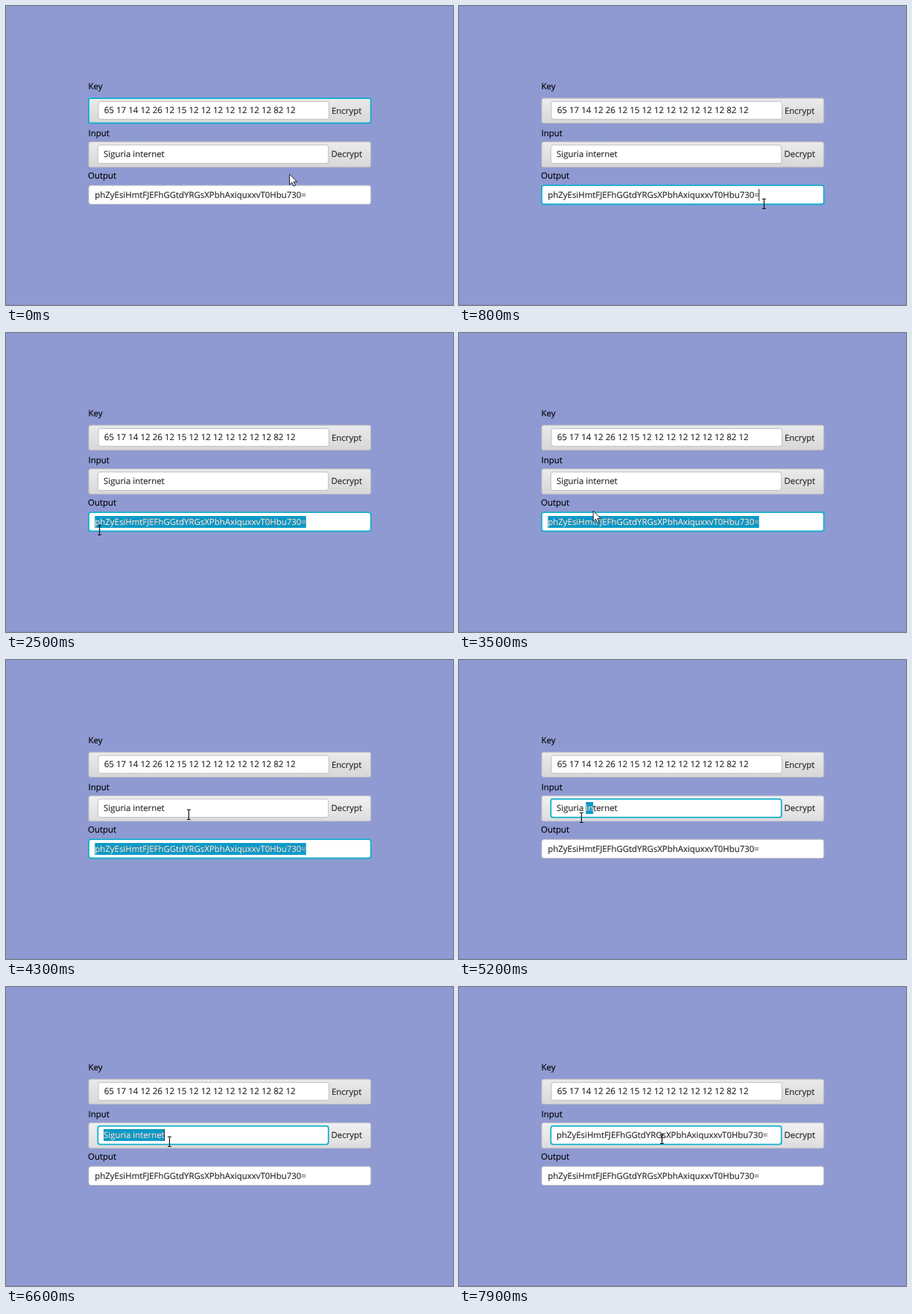
An HTML page that plays this animation: 600x402 px, repeating every 8000 ms.

```html
<!DOCTYPE html>
<html>
<head>
<meta charset="utf-8">
<style>
  html, body { margin: 0; width: 100%; height: 100%; overflow: hidden; background: #8f9ad2; }
  svg { display: block; }
  text {
    font: 11.42px "Open Sans", "Noto Sans", sans-serif; text-rendering: geometricPrecision; white-space: pre;
    fill: #262626; stroke: #262626; stroke-width: .15;
  }
  .label { fill: #000; stroke: #000; }
  .pane { fill: url(#pane); stroke: #bcbcc0; }
  .hover { filter: brightness(1.025); }
  .field { fill: #fff; stroke: #bfbfc4; }
  .focused { stroke: #16b0cd; stroke-width: 1.8; }
  .inverse { fill: #fff; stroke: #fff; }
</style>
</head>
<body>
<svg width="600" height="402" viewBox="0 0 600 402">
  <defs>
    <linearGradient id="pane" x2="0" y2="1">
      <stop stop-color="#ebebeb"/><stop offset="1" stop-color="#d7d7d7"/>
    </linearGradient>
    <clipPath id="selected"><rect id="clip" height="16"/></clipPath>
  </defs>
  <rect y="401" width="600" height="1" fill="#8790c4"/>

  <text class="label" x="110.5" y="112">Key</text>
  <text class="label" x="110.5" y="175">Input</text>
  <text class="label" x="110" y="232">Output</text>

  <rect id="keyPane" class="pane" x="111" y="124" width="378.7" height="33.5" rx="2.5"/>
  <rect class="field" x="124" y="128.3" width="309.5" height="24" rx="3"/>
  <text x="131.7" y="144.3" style="font-size:11.58px">65 17 14 12 26 12 15 12 12 12 12 12 12 12 82 12</text>
  <text x="437" y="144.5">Encrypt</text>

  <rect id="inputPane" class="pane" x="111" y="182.7" width="378.7" height="34" rx="2.5"/>
  <rect id="inputBox" class="field" x="123.3" y="186.9" width="309.5" height="24.7" rx="3"/>
  <text x="436.5" y="203.2">Decrypt</text>

  <rect id="outputBox" class="field" x="111" y="241.2" width="378.7" height="25.3" rx="3"/>

  <rect id="highlight" height="16" fill="#0a9ac8"/>
  <text id="inputText" x="131" y="203.2"></text>
  <text id="outputText" x="119.3" y="258.2"></text>
  <text id="inverse" class="inverse" clip-path="url(#selected)"></text>
  <rect id="caret" width="1" height="16" fill="#222"/>

  <path id="arrow" d="M0 0V14.2L3.3 11.2L5.6 16.2L7.8 15.2L5.6 10.3H10Z" fill="#fff" stroke="#111" stroke-width=".9"/>
  <path id="beam" d="M-2.5-6.5H-.5L0-6L.5-6.5H2.5M0-6V6M-2.5 6.5H-.5L0 6L.5 6.5H2.5" fill="none" stroke="#111" stroke-width="1.2"/>
</svg>
<script>
const LOOP = 8000, LAG = 100, PASTE = 7100, ASCENT = 12.2;
const CIPHER = 'phZyEsiHmtFJEFhGGtdYRGsXPbhAxiquxxvT0Hbu730=';
const $ = id => document.getElementById(id);

// Pointer path: time, x, y
const path = [
  [0, 380, 226], [100, 380, 226], [500, 409, 266], [1000, 409, 266],
  [1400, 336, 262], [2300, 119, 265], [2450, 125, 265], [3000, 125, 265],
  [4100, 245, 208], [4300, 245, 208], [4650, 182, 210], [4850, 182, 210],
  [5200, 164, 212], [5500, 128, 208], [5750, 128, 208], [6450, 219, 208],
  [7300, 219, 208], [7900, 272, 204], [LOOP, 272, 204]
];
const drags = [
  { press: 700, release: 2300, field: 'output' },
  { press: 4650, release: 5500, field: 'input' },
  { press: 5580, release: 6600, field: 'input' }
];

function pointer(t) {
  const i = path.findIndex(p => p[0] > t);
  const [t0, x0, y0] = path[i - 1], [t1, x1, y1] = path[i];
  const k = (t - t0) / (t1 - t0);
  return [x0 + (x1 - x0) * k, y0 + (y1 - y0) * k];
}

function set(id, attrs) {
  for (const name in attrs) $(id).setAttribute(name, attrs[name]);
}

function show(id, visible) {
  $(id).style.display = visible ? '' : 'none';
}

// Character boundary closest to x
function snap(text, x) {
  const start = +text.getAttribute('x');
  let best = start;
  for (let i = 1; i <= text.textContent.length; i++) {
    const edge = start + text.getSubStringLength(0, i);
    if (Math.abs(edge - x) < Math.abs(best - x)) best = edge;
  }
  return best;
}

function drawSelection(t, drag) {
  show('highlight', drag);
  show('inverse', drag);
  show('caret', drag);
  if (!drag) return;
  const text = $(drag.field + 'Text'), baseline = +text.getAttribute('y');
  const pasted = t >= PASTE;
  const held = Math.max(drag.press, Math.min(t - LAG, drag.release));
  const edge = snap(text, pasted ? 600 : pointer(held)[0]);
  const anchor = pasted ? edge : snap(text, pointer(drag.press)[0]);
  const y = baseline - ASCENT;
  const box = { x: Math.min(anchor, edge), y, width: Math.abs(edge - anchor) };
  set('highlight', box);
  set('clip', box);
  set('inverse', { x: text.getAttribute('x'), y: baseline });
  $('inverse').textContent = text.textContent;
  set('caret', { x: edge - .5, y });
  show('caret', (t - (pasted ? PASTE : drag.press)) % 1000 < 500);
}

function draw(t) {
  const drag = drags.filter(d => t >= d.press).pop();
  const [x, y] = pointer(t);
  $('inputText').textContent = t < PASTE ? 'Siguria internet' : CIPHER;
  $('keyPane').classList.toggle('focused', !drag);
  $('inputPane').classList.toggle('hover', y >= 183 && y <= 217);
  for (const field of ['input', 'output'])
    $(field + 'Box').classList.toggle('focused', drag?.field === field);
  drawSelection(t, drag);

  const overText = y >= 241 && y <= 267 || y >= 187 && y <= 212 && x >= 123 && x <= 433;
  show('beam', overText);
  show('arrow', !overText);
  set(overText ? 'beam' : 'arrow', { transform: `translate(${x + .5} ${y})` });
}

$('outputText').textContent = CIPHER;
(function frame() {
  draw(performance.now() % LOOP);
  requestAnimationFrame(frame);
})();
</script>
</body>
</html>
```
